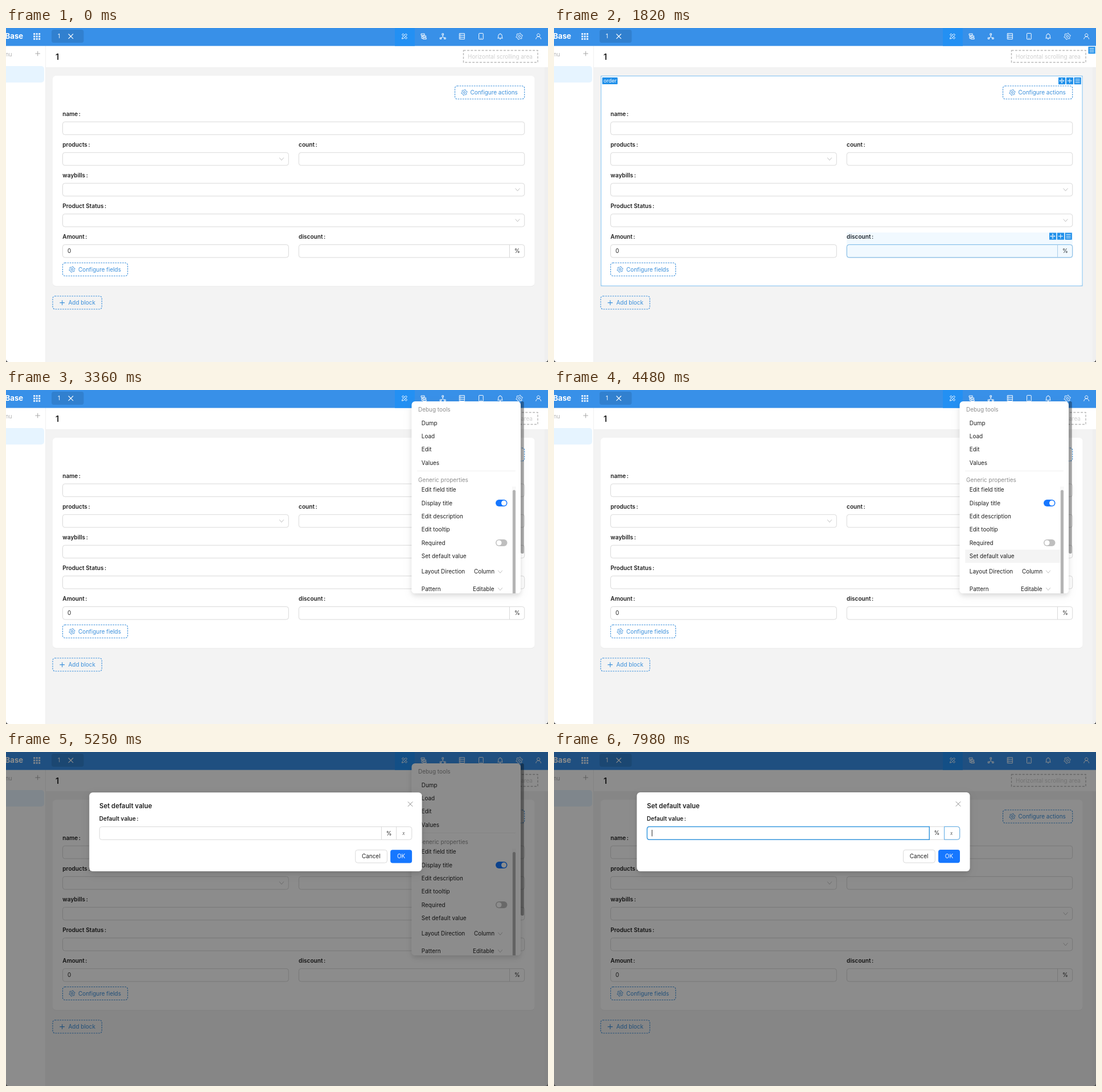
These frames come from a looping animation (952x588 px, 8000 ms). An HTML page:

```html
<!DOCTYPE html>
<html lang="en">
<head>
<meta charset="utf-8">
<title>Set default value</title>
<style>
html, body { margin: 0; width: 100%; height: 100%; overflow: hidden; background: #f3f3f3; }
svg { display: block; width: 952px; height: 588px; }
text { font-family: Inter, "Open Sans", sans-serif; white-space: pre; }
</style>
</head>
<body>
<svg id="stage" viewBox="0 0 952 588" xmlns="http://www.w3.org/2000/svg"></svg>
<script>
const LOOP = 8000, STEP = 70;
const BLUE = '#1677ff', LINK = '#3a8fdb', INK = '#1f1f1f', LINE = '#d9d9d9';
const FONT = 9.95;

// y is the middle of the line
const text = (x, y, s, { size = FONT, fill = INK, weight = 400, extra = '' } = {}) =>
  `<text x="${x}" y="${y + size * 0.36}" font-size="${size}" fill="${fill}" font-weight="${weight}" ${extra}>${s}</text>`;
const rect = (x1, y1, x2, y2, fill, r = 0, extra = '') =>
  `<rect x="${x1}" y="${y1}" width="${x2 - x1}" height="${y2 - y1}" rx="${r}" fill="${fill}" ${extra}/>`;
const path = (d, stroke, width = 1, extra = '') =>
  `<path d="${d}" fill="none" stroke="${stroke}" stroke-width="${width}" ${extra}/>`;
const shape = (d, fill) => `<path d="${d}" fill="${fill}"/>`;
const at = (x, y, body) => `<g transform="translate(${x} ${y})">${body}</g>`;
const group = (id, body) => `<g id="${id}">${body}</g>`;
const box = (x1, y1, x2, y2, stroke = LINE, fill = '#fff', extra = '') =>
  rect(x1, y1, x2, y2, fill, 4, `stroke="${stroke}" ${extra}`);
const dashed = (x1, y1, x2, y2, stroke) =>
  box(x1, y1, x2, y2, stroke, 'none', 'stroke-dasharray="2.6 1.6" stroke-width="1.1"');
const chevron = (x, y) => path(`M${x - 3.8} ${y - 2.2}l3.8 4.6l3.8 -4.6`, '#bfbfbf');
const cross = (x, y, r, c, w = 1) =>
  path(`M${x - r} ${y - r}l${2 * r} ${2 * r}m0 ${-2 * r}l${-2 * r} ${2 * r}`, c, w);
const plus = (x, y, r, c, w = 1) => path(`M${x - r} ${y}h${2 * r}M${x} ${y - r}v${2 * r}`, c, w);
const label = (x, y, s) =>
  text(x, y, `${s}<tspan dx="1.5">:</tspan>`, { weight: 600, size: 10.1 });

function gear(x, y, c, r = 4.4) {
  const pts = [];
  for (let i = 0; i < 24; i++) {
    const a = (i + 0.5) * Math.PI / 12, k = i % 4 < 2 ? r * 1.16 : r * 0.86;
    pts.push(`${(x + k * Math.sin(a)).toFixed(2)} ${(y - k * Math.cos(a)).toFixed(2)}`);
  }
  return path(`M${pts.join('L')}Z`, c, 0.95, 'stroke-linejoin="round"') +
    `<circle cx="${x}" cy="${y}" r="${r * 0.38}" fill="none" stroke="${c}" stroke-width=".95"/>`;
}

function header() {
  const w = '#fff', bottom = 31.6;
  let s = rect(0, 0, 952, bottom, '#3890e8') + rect(683, 0, 718, bottom, '#2390f3');
  s += text(-1.5, 14.5, 'Base', { size: 13.2, fill: w, weight: 700 });
  for (let i = 0; i < 9; i++) {
    const x = 48.2 + i % 3 * 4.5, y = 9 + (i / 3 | 0) * 4.4;
    s += rect(x, y, x + 3, y + 3, '#e6f2ff');
  }
  s += rect(80, 3, 136.5, 26, '#3180cf', 4) + text(91, 14.7, '1', { fill: w }) + cross(113.8, 14.7, 4.2, w, 1.1);
  const icons = [
    'M-4.5 4.5L-3.8 1.8L2.5 -4.5L4.5 -2.5L-1.8 3.8ZM-2 -.2L-4.6 -2.8L-2.6 -4.6L0 -2.2M2 .2L4.6 2.8L2.6 4.6L0 2.2',
    'M-4.5 -4.5H1.5V-1.8H-4.5ZM-1.5 -.8H4V1.4H-1.5ZM-1 2.6H4.6V5H-1ZM-3.5 -1.5V.4H-1.5M-3.5 .4V3.8H-1',
    'M0 -2V1L-3.4 3.2M0 1L3.4 3.2M-1.3 -4.8H1.3V-2.2H-1.3ZM-5 2.4H-2.4V4.8H-5ZM2.4 2.4H5V4.8H2.4Z',
    'M-4.5 -5H4.5V5H-4.5ZM-4.5 -1.7H4.5M-4.5 1.7H4.5M-2.8 -3.3h1M-2.8 0h1M-2.8 3.3h1',
    'M-3 -5.2H3Q3.8 -5.2 3.8 -4.4V4.4Q3.8 5.2 3 5.2H-3Q-3.8 5.2 -3.8 4.4V-4.4Q-3.8 -5.2 -3 -5.2ZM-.6 3.3h1.2',
    'M-4.6 3.3H4.6M-3.3 3.3V-.8A3.3 3.3 0 0 1 3.3 -.8V3.3M0 -4V-5.2M-1 4.8H1',
    '',
    'M-4.4 5A4.4 4.4 0 0 1 4.4 5M0 .6A2.6 2.6 0 1 1 .01 .6'
  ];
  icons.forEach((d, i) => { s += at(700 + i * 33.6, 14.6, d ? path(d, w) : gear(0, 0, w, 4.9)); });
  return s;
}

function page() {
  let s = rect(0, 0, 952, 588, '#f3f3f3') + rect(946, 69, 952, 588, '#efefef');
  s += rect(0, 31, 69.5, 588, '#fff') + rect(69, 31, 70, 588, '#f0f0f0') + rect(70, 31, 952, 69, '#fff');
  s += header();
  s += text(-1, 46, 'nu', { fill: '#b5b5b5' }) + plus(55.7, 45, 4.3, '#a6a6a6');
  s += rect(-8, 67, 67, 96, '#e6f4ff', 5);
  s += text(87, 50.8, '1', { size: 14.6, weight: 600 });
  s += `<rect x="803.5" y="39.5" width="130.5" height="21" fill="none" stroke="#b8b8b8" stroke-width="1.4" stroke-dasharray="4 2.4"/>`;
  s += text(811, 50, 'Horizontal scrolling area', { fill: '#cfcfcf' });
  s += rect(82, 85, 928.5, 455.2, '#e9e9e9', 6) + rect(82, 84, 928.5, 454.3, '#fff', 6);
  s += dashed(788.5, 102, 910.7, 125, LINK) + gear(805, 113.5, LINK) + text(815.5, 113.5, 'Configure actions', { fill: LINK });

  const field = (x1, x2, row, name) => {
    const y = 165.2 + row * 54.05;
    return label(x1 - 0.2, y - 14.2, name) + box(x1, y, x2, y + 22.6);
  };
  s += field(99.5, 910.7, 0, 'name') + field(99.5, 496.3, 1, 'products') + field(514.3, 910.7, 1, 'count');
  s += field(99.5, 910.7, 2, 'waybills') + field(99.5, 910.7, 3, 'Product Status');
  s += field(99.5, 496.3, 4, 'Amount') + field(514.3, 910.7, 4, 'discount');
  s += chevron(484, 230.5) + chevron(898.5, 284.5) + chevron(898.5, 338.5);
  s += path('M884.5 381.4v22.6', LINE) + text(108, 392.8, '0') + text(893, 392.8, '%');
  s += dashed(99.5, 413.5, 213.7, 436.5, LINK) + gear(116, 425, LINK) + text(127, 425, 'Configure fields', { fill: LINK });
  s += dashed(82, 472, 168.3, 495, LINK) + plus(98.7, 483.6, 4.3, LINK, 1.1) + text(109.5, 483.5, 'Add block', { fill: LINK });
  return s;
}

const TOOL = '#2090ea';
function tool(x, y, kind) {
  const glyph = {
    move: 'M2 6H10M6 2V10M4.8 3.2L6 2L7.2 3.2M4.8 8.8L6 10L7.2 8.8M3.2 4.8L2 6L3.2 7.2M8.8 4.8L10 6L8.8 7.2',
    add: 'M2 6H10M6 2V10',
    menu: 'M2 3H10M2 6H10M2 9H10'
  }[kind];
  return at(x, y, rect(0, 0, 12.2, 12.2, TOOL) + path(glyph, '#fff'));
}
const tools = (x, y) => ['move', 'add', 'menu'].map((k, i) => tool(x + i * 13.8, y, k)).join('');

const blockFrame = () =>
  `<rect x="82.7" y="84.5" width="845.3" height="369.5" fill="none" stroke="#7cc0f2"/>` +
  rect(84.7, 87, 111.7, 99, TOOL, 1) + text(87, 92.8, 'order', { size: 9, fill: '#fff' }) +
  tools(886, 87);

const fieldFrame = () =>
  rect(514, 360, 911, 405, '#1890ff', 0, 'fill-opacity=".06"') + tools(870, 360.5);

function toggle(y, on) {
  return rect(860, y - 6, 880.5, y + 6, on ? BLUE : '#bfbfbf', 6) +
    `<circle cx="${on ? 874.5 : 866}" cy="${y}" r="4.5" fill="#fff"/>`;
}

function menu() {
  const dim = { fill: '#8c8c8c' };
  let s = rect(712.5, 20, 904, 358, '#fff', 6, 'filter="url(#shade)"');
  s += rect(904, 20, 909.7, 288, '#000', 2.5, 'fill-opacity=".34"');
  s += rect(889, 170, 895.5, 358, '#f8f8f8');
  s += shape('M889.9 358V178.5Q889.9 176 892.4 176Q895 176 895 178.5V358Z', '#b4b4b4');
  s += `<rect id="pick" x="722.3" width="166.7" fill="#f4f4f4"/>`;
  s += text(724, 34.5, 'Debug tools', dim);
  ['Dump', 'Load', 'Edit', 'Values'].forEach((n, i) => { s += text(729.8, 58 + i * 23.4, n); });
  s += path('M722 142.5H895', '#f0f0f0') + text(724, 158, 'Generic properties', dim);
  ['Edit field title', 'Display title', 'Edit description', 'Edit tooltip', 'Required', 'Set default value']
    .forEach((n, i) => { s += text(729.8, 175.6 + i * 23.4, n); });
  s += toggle(199, true) + toggle(269, false);
  s += text(729.8, 319.8, 'Layout Direction') + text(822, 319.8, 'Column') + chevron(868, 319.8);
  s += text(729.8, 350.3, 'Pattern') + text(820, 350.3, 'Editable') + chevron(868, 350.3);
  return s;
}

function modal() {
  let s = rect(145.5, 71, 730.5, 210, '#fff', 6, 'filter="url(#shade)"');
  s += text(163.3, 94.5, 'Set default value', { size: 11.4, weight: 600 }) + cross(710, 91.5, 4.2, '#8c8c8c');
  s += label(163, 117, 'Default value');
  s += box(163.5, 131.4, 712.7, 154.2) + path('M659.3 131.4v22.8M685.5 131.4v22.8', LINE);
  s += text(667.5, 142.8, '%');
  s += text(696, 142.8, 'x', { size: 9.5, fill: '#555', extra: 'font-style="italic" style="font-family:\'Liberation Serif\',serif"' });
  s += `<path id="focus" d="M659.3 131.4V154.2H167.5Q163.5 154.2 163.5 150.2V135.4Q163.5 131.4 167.5 131.4Z" fill="none" stroke="#3b9ae0"/>`;
  s += `<path id="xhover" d="M685.5 131.4H708.7Q712.7 131.4 712.7 135.4V150.2Q712.7 154.2 708.7 154.2H685.5Z" fill="none" stroke="#5aaae6"/>`;
  s += `<path id="caret" d="M172.2 137v11.5" stroke="#222"/>`;
  s += box(613.5, 172.3, 669.3, 195) + text(624.8, 183.8, 'Cancel');
  s += rect(675, 172, 713, 195.3, BLUE, 4) + text(686.8, 183.8, 'OK', { fill: '#fff' });
  return s;
}

const $ = id => document.getElementById(id);
$('stage').innerHTML =
  `<defs><filter id="shade" x="-20%" y="-25%" width="140%" height="160%">
    <feDropShadow dx="0" dy="4" stdDeviation="4.5" flood-color="#000" flood-opacity=".1"/>
    <feDropShadow dx="0" dy="4" stdDeviation="8" flood-color="#000" flood-opacity=".06"/></filter></defs>` +
  page() +
  group('block', blockFrame()) + group('field', fieldFrame()) +
  group('glow', box(514.3, 381.4, 910.7, 404, '#7cbcec', 'none') + path('M884.5 381.4v22.6', '#a9cdea')) +
  group('corner', tool(938.5, 33, 'menu')) +
  group('menu', menu()) +
  `<rect id="mask" width="952" height="588" fill="#000"/>` +
  group('modal', modal()) +
  shape('M0 588V583.5Q.5 587.5 4.5 588ZM952 588V583.5Q951.5 587.5 947.5 588Z', '#444');

const clamp = v => Math.max(0, Math.min(1, v));
const ramp = (t, a, b) => clamp((t - a) / (b - a));
const within = (t, a, b) => t >= a && t < b;
const show = (id, v) => {
  $(id).setAttribute('opacity', v);
  $(id).style.display = v > 0 ? '' : 'none';
};

// y of the cubic Bezier (.08,.82)(.17,1) at x
function easeOut(x) {
  let lo = 0, hi = 1;
  for (let i = 0; i < 24; i++) {
    const u = (lo + hi) / 2, v = 1 - u;
    if (3 * v * v * u * 0.08 + 3 * v * u * u * 0.17 + u ** 3 < x) lo = u; else hi = u;
  }
  const v = 1 - lo;
  return 3 * v * v * lo * 0.82 + 3 * v * lo * lo + lo ** 3;
}
const scaleAt = (x, y, sx, sy) => `translate(${x * (1 - sx)} ${y * (1 - sy)}) scale(${sx} ${sy})`;

function draw(t) {
  show('field', +within(t, 1820, 3220));
  show('block', +within(t, 1820, 3290));
  show('corner', +within(t, 1820, 3360));
  show('glow', t < 1820 ? 0 : 1 - ramp(t, 1960, 2240));

  const opened = easeOut(ramp(t, 2565, 2730)), closed = ramp(t, 5250, 5460);
  const vis = t < 2590 ? 0 : opened * (1 - closed ** 2);
  show('menu', vis);
  $('menu').setAttribute('transform', scaleAt(712, 20, 1, 0.8 + 0.2 * vis));

  // time, top and height of the hovered menu row
  const rows = [[3500, 304.8, 30], [3780, 281, 23.4], [3920, 257.6, 23.4], [4480, 281, 23.4]];
  const row = rows.filter(r => t >= r[0]).pop();
  show('pick', row && t < 5180 ? 1 : 0);
  if (row) {
    $('pick').setAttribute('y', row[1]);
    $('pick').setAttribute('height', row[2]);
  }

  const zoom = t < 5180 ? 0 : easeOut(ramp(t, 5163.7, 5262));
  const s = 0.2 + 0.8 * zoom;
  show('mask', t < 5180 ? 0 : 0.45 * ramp(t, 5110, 5250));
  show('modal', zoom);
  $('modal').setAttribute('transform', scaleAt(805, 288, s, s));

  show('focus', ramp(t, 6230, 6370));
  $('focus').setAttribute('stroke-width', t < 6650 ? 1 : 1.5);
  show('caret', +(t >= 6650 && (t - 6650) % 980 < 490));
  show('xhover', +(t >= 7980));
}

function tick(now) {
  const t = now % LOOP;
  draw(Math.floor(t / STEP) * STEP);
  requestAnimationFrame(tick);
}
draw(0);
requestAnimationFrame(tick);
</script>
</body>
</html>
```
